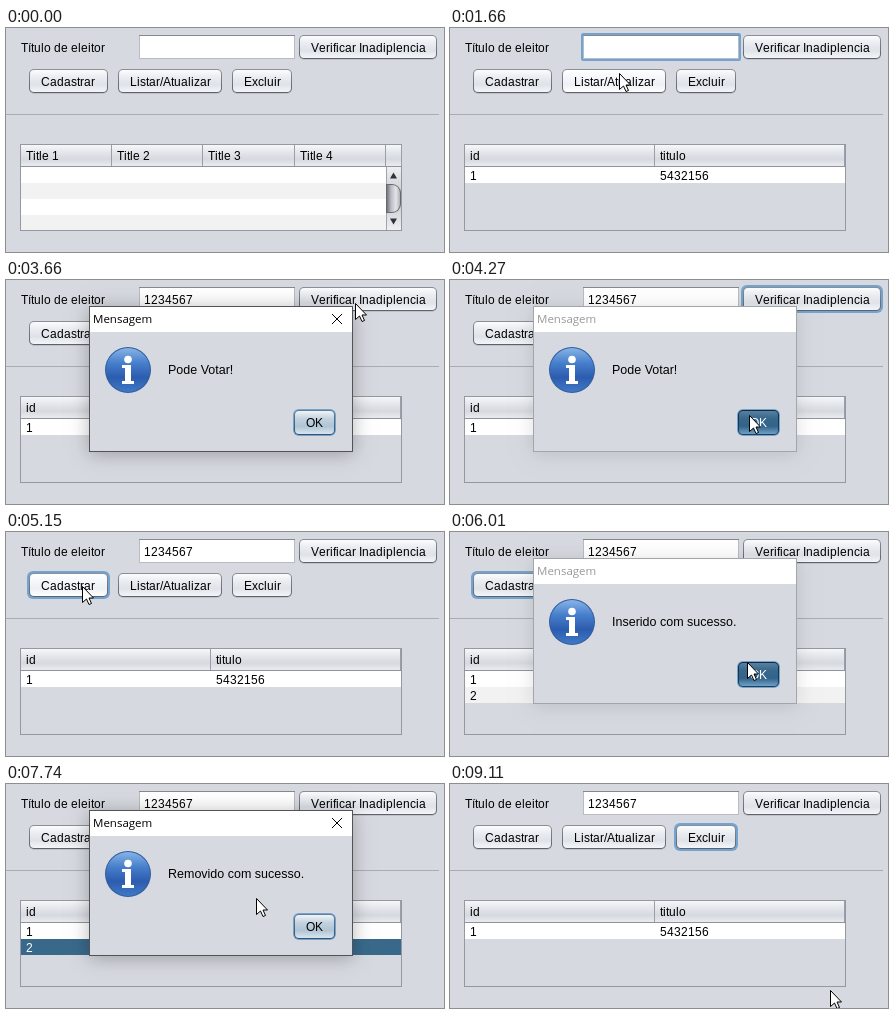
An HTML page with a canvas for the animation above (9200 ms loop, 438 by 224 pixels).

```html
<!DOCTYPE html>
<html lang="pt">
<head>
<meta charset="utf-8">
<title>Título de eleitor</title>
<style>
html, body { margin: 0; width: 100%; height: 100%; overflow: hidden; background: #d6d9df; }
canvas { display: block; width: 438px; height: 224px; }
</style>
</head>
<body>
<canvas id="stage" width="438" height="224"></canvas>
<script>
const ctx = document.getElementById('stage').getContext('2d');
const LOOP = 9200;
const TICK = 78;
const BG = '#d6d9df';
const SANS = '"Liberation Sans", Arial, sans-serif';

// Pointer moves: departure time and goal; the distance sets the duration
const moves = [
  [70, 268, 97], [80, 242, 56], [230, 152, 40], [430, 170, 46],
  [1680, 172, 18], [2540, 184, 50], [3020, 350, 24], [3800, 300, 136],
  [4340, 90, 49], [4680, 77, 55], [5400, 298, 131], [6200, 100, 166],
  [6800, 255, 50], [7420, 251, 115], [7800, 305, 140], [8800, 381, 207]
];

const buttons = [
  { id: 'check', label: 'Verificar Inadiplencia', x: 293, y: 7, w: 138, down: 3400 },
  { id: 'add', label: 'Cadastrar', x: 23, y: 41, w: 79, down: 4980 },
  { id: 'list', label: 'Listar/Atualizar', x: 112, y: 41, w: 104, down: 790 },
  { id: 'drop', label: 'Excluir', x: 226, y: 41, w: 60, down: 7250 }
];
const HOLD = 160;

const dialogs = [
  { msg: 'Pode Votar!', open: 3490, press: 4190, shut: 4270 },
  { msg: 'Inserido com sucesso.', open: 5220, press: 5850, shut: 6010 },
  { msg: 'Removido com sucesso.', open: 7340, press: 8140, shut: 8220 }
];

// Start time and owner of the keyboard focus
const focusLog = [[0, ''], [790, 'field'], [3400, 'check'], [4980, 'add'], [6530, 'table'], [7250, 'drop']];

const clamp = v => Math.max(0, Math.min(1, v));
const steps = ms => Math.floor(ms / 80);

function pointerAt(t) {
  const now = t - t % TICK;
  if (t < moves[0][0]) return null;
  let [, x, y] = moves[0];
  for (const [at, gx, gy] of moves) {
    const dx = gx - x, dy = gy - y;
    const k = clamp((now - at) / (100 + Math.hypot(dx, dy)));
    const e = k * k * (3 - 2 * k);
    x += dx * e;
    y += dy * e;
  }
  return { x: Math.round(x), y: Math.round(y) };
}

function rect(x, y, w, h, fill) {
  ctx.fillStyle = fill;
  ctx.fillRect(x, y, w, h);
}

function vgrad(y0, y1, ...colors) {
  const g = ctx.createLinearGradient(0, y0, 0, y1);
  colors.forEach((c, i) => g.addColorStop(i / (colors.length - 1), c));
  return g;
}

function round(x, y, w, h, r, fill) {
  ctx.beginPath();
  ctx.roundRect(x, y, w, h, r);
  ctx.fillStyle = fill;
  ctx.fill();
}

function disc(x, y, r, fill) {
  ctx.beginPath();
  ctx.arc(x, y, r, 0, 7);
  ctx.fillStyle = fill;
  ctx.fill();
}

// Whole-pixel advances, as in hinted interface text
function text(s, x, y, color = '#000') {
  ctx.font = '12px ' + SANS;
  ctx.fillStyle = color;
  for (const ch of s) {
    ctx.fillText(ch, x, y);
    x += Math.round(ctx.measureText(ch).width);
  }
}

function button(x, y, w, h, label, s) {
  const b = y + h, ring = s.main ? 1 : 2;
  if (s.focus) round(x - ring, y - ring, w + 2 * ring, h + 2 * ring, 6, '#73a4d1');
  else round(x, y + 1, w, h, 5, '#bfc2c9');
  let edge = ['#8c8f97', '#5d6169'], face = ['#fbfcfd', '#e9ecf1', '#dfe3e9', '#f3f5f8'];
  if (s.main) { edge = ['#647f97', '#35506a']; face = ['#f0f4f8', '#c3d2df', '#b0c4d4', '#d7e5f0']; }
  if (s.hover) face = ['#ffffff', '#f5f7fa', '#edf0f5', '#ffffff'];
  if (s.down) { edge = ['#14293b', '#20405a']; face = ['#5780a1', '#37678b', '#33638a', '#70a0c4']; }
  round(x, y, w, h, 5, vgrad(y, b, ...edge));
  round(x + 1, y + 1, w - 2, h - 2, 4, vgrad(y + 1, b - 1, ...face));
  text(label, x + 12, y + 17, s.down ? '#fff' : '#000');
}

function field(t, focused) {
  if (focused) round(131, 5, 160, 28, 2, '#73a4d1');
  rect(133, 7, 156, 24, '#b8bbc1');
  rect(133, 7, 156, 1, '#85888e');
  rect(134, 8, 154, 22, '#fff');
  const n = Math.max(0, Math.min(7, Math.floor((t - 2140) / TICK) + 1));
  text('1234567'.slice(0, n), 138, 24);
  const lit = n > 0 || Math.floor(t / 500) % 2 === 0;
  if (focused && lit) rect(137 + 7 * n, 11, 1, 16, '#000');
}

function header(x, end, label) {
  rect(x, 117, end - x, 21, vgrad(117, 138, '#f6f7f9', '#e4e7eb', '#d6d9df', '#e9ebef'));
  rect(end - 1, 117, 1, 21, '#9a9ea6');
  text(label, x + 5, 132);
}

function scrollbar() {
  rect(380, 139, 15, 63, vgrad(139, 202, '#eef0f2', '#c3c6cc', '#eef0f2'));
  rect(380, 139, 1, 63, '#a0a4ab');
  const g = ctx.createLinearGradient(380, 0, 395, 0);
  ['#5f636a', '#b9bcc2', '#e3e5e8', '#a0a4aa'].forEach((c, i) => g.addColorStop(i / 3, c));
  round(380, 156, 15, 29, [0, 9, 9, 0], '#656970');
  round(381, 157, 13, 27, [0, 8, 8, 0], g);
  for (const dir of [1, -1]) {
    const y = 170.5 - 23 * dir;
    ctx.beginPath();
    ctx.moveTo(384, y + 3 * dir);
    ctx.lineTo(391, y + 3 * dir);
    ctx.lineTo(387.5, y - 3 * dir);
    ctx.fillStyle = '#2f3338';
    ctx.fill();
  }
}

function table(t, focused) {
  rect(14, 116, 382, 87, '#9498a0');
  rect(15, 117, 380, 85, BG);
  if (t < 950) {
    const edge = i => 15 + Math.round(91.2 * i);
    for (let i = 0; i < 4; i++) {
      header(edge(i), edge(i + 1), 'Title ' + (i + 1));
      rect(15, 139 + 16 * i, 365, i < 3 ? 16 : 15, i % 2 ? '#f2f2f2' : '#fff');
    }
    header(380, 396, '');
    scrollbar();
  } else {
    header(15, 205, 'id');
    header(205, 395, 'titulo');
    const rows = ['5432156'];
    if (t >= 6010 && t < 8720) rows.push('1234567');
    rows.forEach((v, i) => {
      const y = 139 + 16 * i, picked = i === 1 && t >= 6530;
      rect(15, y, 380, 16, picked ? '#39698a' : i ? '#f2f2f2' : '#fff');
      if (picked && focused) {
        ctx.strokeStyle = '#24445c';
        ctx.strokeRect(15.5, y + .5, 189, 15);
      }
      const ink = picked ? '#fff' : '#000';
      text(String(i + 1), 20, y + 13, ink);
      text(v, 210, y + 13, ink);
    });
  }
  rect(14, 138, 382, 1, '#8f939b');
}

function infoIcon(x, y) {
  disc(x, y, 23, '#315b9f');
  disc(x, y, 22, vgrad(y - 22, y + 22, '#87b4e6', '#4780cc', '#2d5cae', '#3f79c6'));
  disc(x, y - 10.5, 3.8, '#fff');
  rect(x - 6, y - 5, 9, 3, '#fff');
  rect(x - 3, y - 5, 6, 18, '#fff');
  rect(x - 6, y + 11, 12, 3, '#fff');
}

function dialog(d, t) {
  const closing = t >= d.shut;
  const a = closing ? 1 - steps(t - d.shut) / 2 : Math.min(1, (1 + steps(t - d.open)) / 3);
  const k = .92 + .08 * a;
  ctx.save();
  ctx.globalAlpha = a;
  ctx.translate(215, 99);
  ctx.scale(k, k);
  ctx.translate(-215, -99);
  ctx.shadowColor = closing ? 'rgba(0,0,0,.12)' : 'rgba(0,0,0,.28)';
  ctx.shadowBlur = 18;
  ctx.shadowOffsetY = 2;
  rect(83, 26, 264, 146, closing ? '#a2a5aa' : '#505358');
  ctx.shadowColor = 'transparent';
  rect(84, 27, 262, 25, '#fff');
  rect(84, 52, 262, 119, BG);
  ctx.font = '11.5px "Open Sans", "Noto Sans", sans-serif';
  ctx.fillStyle = closing ? '#999' : '#000';
  ctx.fillText('Mensagem', 87, 43);
  if (!closing) {
    ctx.strokeStyle = '#000';
    ctx.beginPath();
    for (const s of [1, -1]) {
      ctx.moveTo(331 - 5 * s, 34);
      ctx.lineTo(331 + 5 * s, 44);
    }
    ctx.stroke();
  }
  infoIcon(122, 90);
  ctx.font = '12.5px ' + SANS;
  ctx.fillStyle = '#000';
  ctx.fillText(d.msg, 162, 94);
  button(288, 130, 41, 25, 'OK', { main: true, focus: true, down: t >= d.press });
  ctx.restore();
}

function pointer(p, beam) {
  ctx.save();
  ctx.translate(p.x, p.y);
  if (beam) {
    rect(0, -7, 1, 14, '#000');
    for (const y of [-8, 7]) {
      rect(-3, y, 3, 1, '#000');
      rect(1, y, 3, 1, '#000');
    }
  } else {
    ctx.translate(-.5, -.5);
    ctx.fillStyle = '#fff';
    ctx.strokeStyle = '#000';
    const tip = new Path2D('M0 0V16L4 12.5 6.5 18 9 17 6.5 11.5H11Z');
    ctx.fill(tip);
    ctx.stroke(tip);
  }
  ctx.restore();
}

function draw(t) {
  const p = pointerAt(t);
  const box = dialogs.find(d => t >= d.open && t < d.shut + HOLD);
  const modal = box && t < box.shut;
  const focus = modal ? '' : focusLog.filter(f => f[0] <= t).pop()[1];
  const over = (x, y, w, h) => p && !box && p.x >= x && p.x < x + w && p.y >= y && p.y < y + h;

  rect(0, 0, 438, 224, BG);
  text('Título de eleitor', 15, 24);
  field(t, focus === 'field');
  for (const b of buttons)
    button(b.x, b.y, b.w, 24, b.label, {
      hover: over(b.x, b.y, b.w, 24),
      focus: focus === b.id,
      down: t >= b.down && t < b.down + HOLD
    });
  rect(0, 86, 433, 1, '#a9acb4');
  table(t, focus === 'table');
  if (box) dialog(box, t);
  if (p) pointer(p, over(133, 7, 156, 24));
}

const start = performance.now();
function frame() {
  draw((performance.now() - start) % LOOP);
  requestAnimationFrame(frame);
}
frame();
</script>
</body>
</html>
```
